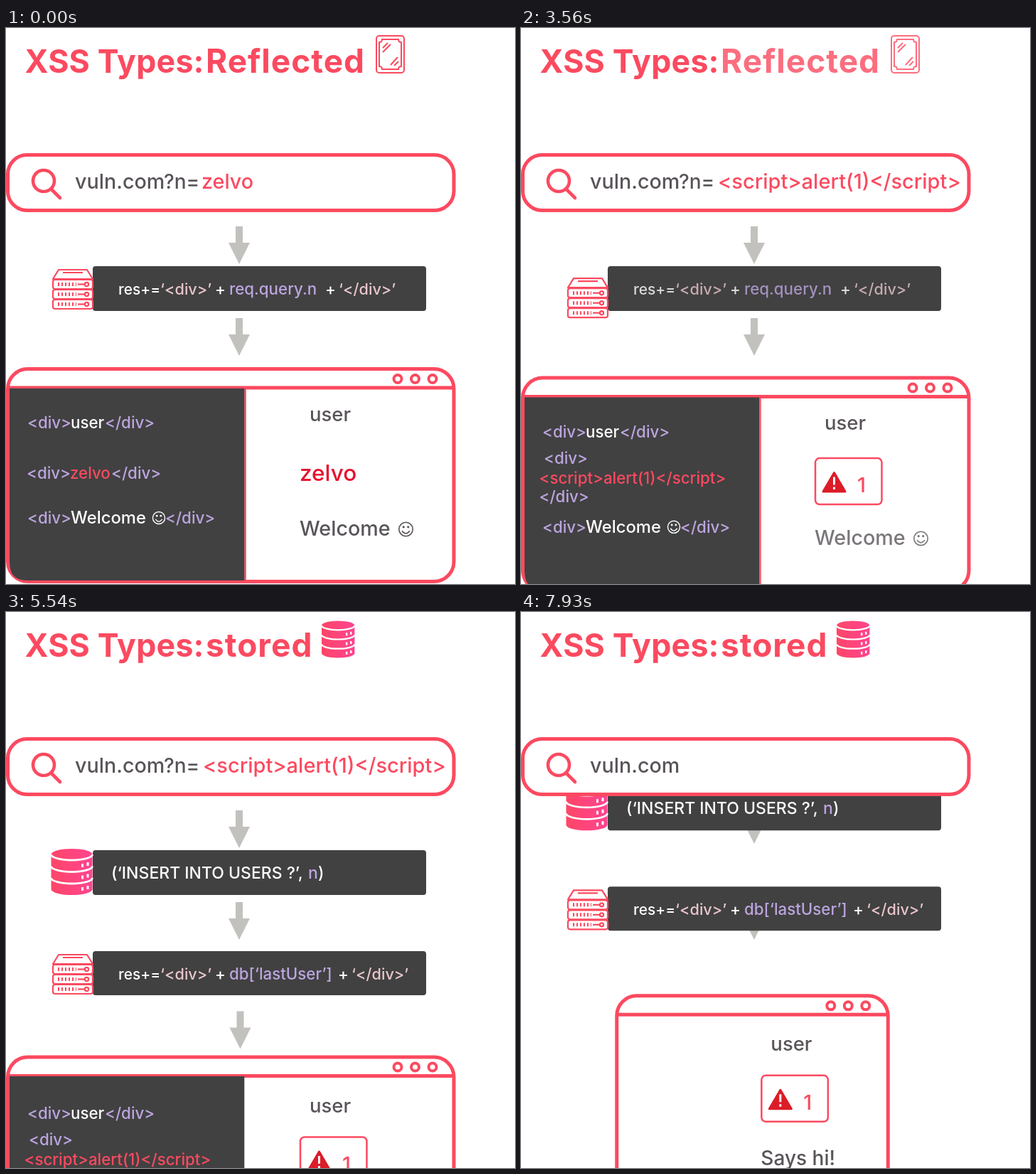
Recreate the animation shown at these times as an HTML page. Size 716 by 782 pixels, loop 8 s.

```html
<!DOCTYPE html>
<html lang="en">
<head>
<meta charset="utf-8">
<title>XSS types</title>
<style>
  html, body { margin: 0; width: 100%; height: 100%; overflow: hidden; background: #fff; }
  svg { display: block; width: 716px; height: 782px; font: 500 22.3px Inter, sans-serif; --red: #fb4a60; }
  text { white-space: pre; }
  .title { font-weight: 700; font-size: 44.7px; letter-spacing: .2px; }
  .kind { font-size: 46px; letter-spacing: 1px; }
  .big { font-size: 28.7px; fill: #595459; }
  .red { fill: var(--red); }
  .line { fill: none; stroke: var(--red); }
  .frame { fill: #fff; stroke: var(--red); stroke-width: 5; }
  .dark { fill: #414141; }
  .white { fill: #fff; }
  .tag { fill: #bda5e0; }
  .lead { font-size: 20.9px; }
  .str { fill: #e9c6cc; font-size: 21.7px; }
  .arrow { fill: #c3c1be; }
</style>
</head>
<body>
<svg viewBox="0 0 716 782">
  <defs>
    <linearGradient id="pink"><stop stop-color="#ff4668"/><stop offset="1" stop-color="#ff4490"/></linearGradient>
    <path id="arrow" class="arrow" d="M-5 0H5V23H15L0 53L-15 23H-5Z"/>
    <g id="unit" class="line" stroke-width="2.2">
      <rect x="1" width="56" height="13" rx="3"/>
      <path d="M8 6.5H34" stroke-width="5" stroke-dasharray="2 3"/>
      <path d="M36 6.5H45"/>
      <circle cx="48.5" cy="6.5" r="2.6"/>
    </g>
    <g id="server">
      <path class="line" stroke-width="2.2" stroke-linejoin="round" d="M9 2H49L57 15H1ZM15 6H43"/>
      <use href="#unit" y="16"/><use href="#unit" y="30"/><use href="#unit" y="44"/>
    </g>
    <g id="layer" fill="none" stroke="#fff">
      <path d="M0 0A29 8 0 0 0 58 0" stroke-width="2.8"/>
      <path d="M44 13V18M51.5 11V16" stroke-width="3"/>
    </g>
    <g id="db">
      <path fill="url(#pink)" d="M0 8A29 8 0 0 1 58 8V57A29 8 0 0 1 0 57Z"/>
      <use href="#layer" y="8"/><use href="#layer" y="24.5"/><use href="#layer" y="41"/>
    </g>
    <g id="smile">
      <circle r="9" fill="none" stroke="currentColor" stroke-width="1.5"/>
      <path d="M-5 2Q0 9 5 2" fill="none" stroke="currentColor" stroke-width="1.5"/>
      <circle cx="-3" cy="-3" r="1.5" fill="currentColor"/><circle cx="3" cy="-3" r="1.5" fill="currentColor"/>
    </g>
  </defs>

  <!-- heading -->
  <text class="title red" x="26.5" y="63">XSS Types:</text>
  <g class="out2">
    <text class="title kind red" x="281" y="63">Reflected</text>
    <g class="line" stroke-width="2">
      <rect x="521" y="11" width="39" height="52" rx="4"/>
      <path d="M529 16H552Q552 20 556 20V54Q552 54 552 58H529Q529 54 525 54V20Q529 20 529 16Z"/>
      <path d="M530 28L537 21M530 34L541 23M541 52L551 41M546 53L552 47"/>
    </g>
  </g>
  <g class="in2">
    <text class="title kind red" x="281" y="63">stored</text>
    <use href="#db" transform="translate(444 12.5) scale(.8)"/>
  </g>

  <!-- server side -->
  <use href="#arrow" x="328" y="279" id="arrow1"/>
  <use href="#arrow" x="328" y="408"/>
  <g class="lift">
    <rect class="dark" x="122" y="335" width="469" height="63" rx="4"/>
    <text class="white out2" y="375"><tspan class="lead" x="158">res+=</tspan><tspan class="str" x="217">‘&lt;div&gt;’</tspan><tspan x="294">+</tspan><tspan class="tag" x="314">req.query.n</tspan><tspan x="449">+</tspan><tspan class="str" x="468">‘&lt;/div&gt;’</tspan></text>
    <g class="in2">
      <text class="white" y="375" style="font-size:23px"><tspan x="148">(‘INSERT INTO USERS ?’, </tspan><tspan class="tag" x="425">n</tspan><tspan x="439">)</tspan></text>
      <use href="#db" x="63.5" y="333"/>
    </g>
  </g>
  <g class="lift"><g class="in2">
    <rect class="dark" x="122" y="477" width="469" height="62" rx="4"/>
    <text class="white" y="517"><tspan class="lead" x="158">res+=</tspan><tspan class="str" x="217">‘&lt;div&gt;’</tspan><tspan x="294">+</tspan><tspan class="tag" x="314">db[‘lastUser’]</tspan><tspan x="467">+</tspan><tspan class="str" x="486">‘&lt;/div&gt;’</tspan></text>
  </g></g>
  <use href="#server" x="65" y="338" id="host"/>

  <!-- address bar -->
  <rect class="frame" x="2.5" y="178.5" width="627.5" height="78" rx="27"/>
  <g class="line" stroke-width="4.6" stroke-linecap="round"><circle cx="53" cy="215" r="15"/><path d="M64 227L76 239"/></g>
  <text class="big" x="97" y="225.5">vuln.com</text>
  <g class="out3">
    <text class="big" x="222" y="225.5" style="font-size:28px">?n=</text>
    <text class="big red out1" x="275" y="225.5">zelvo</text>
    <text class="big red in1" x="277" y="225.5" style="font-size:29px">&lt;script&gt;alert(1)&lt;/script&gt;</text>
  </g>

  <!-- browser window -->
  <g id="window">
    <rect class="frame" id="frame" y="479.5" height="299" rx="28"/>
    <path class="line" id="bar" stroke-width="5"/>
    <g class="line" id="dots" stroke-width="4"><circle cx="551" cy="493.5" r="5.5"/><circle cx="575.5" cy="493.5" r="5.5"/><circle cx="600" cy="493.5" r="5.5"/></g>
    <path class="line" id="divider" stroke-width="2.6" d="M336.5 508V777"/>
  </g>
  <g id="labels">
    <text class="big" x="427" y="552.5" style="font-size:27.5px">user</text>
    <text class="out1" x="413" y="637" style="font-size:31.5px" fill="#e6122e">zelvo</text>
    <g class="out2" color="#595459">
      <text class="big" x="413" y="714">Welcome</text>
      <use href="#smile" transform="translate(562.5 705) scale(1.08)"/>
    </g>
    <text class="big in2" x="413" y="713.5" style="font-size:28px">Says hi!</text>
  </g>
  <g id="alert"><g class="in1">
    <rect x="414" y="592.5" width="93.5" height="65" rx="6" fill="#fff" stroke="#fb4a60" stroke-width="2.5"/>
    <path d="M440.5 613L425 639.5H456Z" fill="#dc1c28" stroke="#dc1c28" stroke-width="3" stroke-linejoin="round"/>
    <path d="M440.5 619V630M440.5 633V636.5" stroke="#fff" stroke-width="3"/>
    <text class="big red" x="473" y="640.5">1</text>
  </g></g>
  <g class="out3">
    <path class="dark" id="panel" d="M5 507H335.3V777H30Q5 777 5 752Z"/>
    <g id="markup" color="#fff">
      <text class="tag" y="563"><tspan x="30">&lt;div&gt;</tspan><tspan class="white" x="91">user</tspan><tspan x="139">&lt;/div&gt;</tspan></text>
      <text class="tag out1" y="634"><tspan x="29">&lt;div&gt;</tspan><tspan class="red" x="90">zelvo</tspan><tspan x="148">&lt;/div&gt;</tspan></text>
      <text class="tag in1"><tspan x="32" y="600.5">&lt;div&gt;</tspan><tspan class="red" x="25.5" y="628">&lt;script&gt;alert(1)&lt;/script&gt;</tspan><tspan x="25.5" y="654">&lt;/div&gt;</tspan></text>
      <text class="tag" y="697"><tspan x="30">&lt;div&gt;</tspan><tspan class="white" x="91" style="font-size:23.8px">Welcome</tspan><tspan x="224">&lt;/div&gt;</tspan></text>
      <use href="#smile" transform="translate(215 689) scale(.95)"/>
    </g>
  </g>
  <use href="#arrow" x="329.5" y="561.5" id="arrow3"/>
</svg>
<script>
const LOOP = 8000;
const get = id => document.getElementById(id);
const ramp = (t, from, to) => Math.min(1, Math.max(0, (t - from) / (to - from)));
const shift = (el, x, y) => el.setAttribute('transform', `translate(${x} ${y})`);
const lifted = document.querySelectorAll('.lift');

// Every transition fades the old parts out before the new ones fade in.
const fades = [
  ['out1', t => 1 - ramp(t, 480, 1130)],
  ['in1', t => ramp(t, 1420, 2040)],
  ['out2', t => 1 - ramp(t, 3440, 4050)],
  ['in2', t => ramp(t, 4300, 4920)],
  ['out3', t => 1 - ramp(t, 7130, 7800)],
].map(([name, level]) => [document.querySelectorAll('.' + name), level]);

function draw(t) {
  for (const [parts, level] of fades)
    for (const part of parts) part.style.opacity = level(t);

  const drop = .865 * ramp(t, 3440, 4660) + .135 * ramp(t, 4660, 5200);
  const rise = Math.pow(Math.max(0, t - 7100) / 830, 1.6);

  lifted.forEach(el => shift(el, 0, -90.5 * rise));
  shift(get('host'), 0, 142 * drop - 90.5 * rise);
  shift(get('arrow1'), 0, -6 * rise);

  const left = 2.5 + 132 * rise, right = 630 - 113.5 * rise;
  shift(get('window'), 0, 146.5 * drop - 86 * rise);
  get('frame').setAttribute('x', left);
  get('frame').setAttribute('width', right - left);
  get('bar').setAttribute('d', `M${left} 506H${right}`);
  shift(get('dots'), -115 * rise, 0);
  get('divider').style.opacity = 1 - ramp(t, 3440, 4600);

  shift(get('labels'), -75.5 * rise, 151 * drop - 86 * rise);
  shift(get('alert'), -75.5 * rise, 146 * drop - 86.5 * rise);
  shift(get('panel'), 0, 146 * drop);
  shift(get('markup'), 0, 149.5 * drop);
  get('arrow3').style.opacity = ramp(t, 4500, 5040) * (1 - ramp(t, 7130, 7560));
}

(function tick() {
  draw(performance.now() % LOOP);
  requestAnimationFrame(tick);
})();
</script>
</body>
</html>
```
